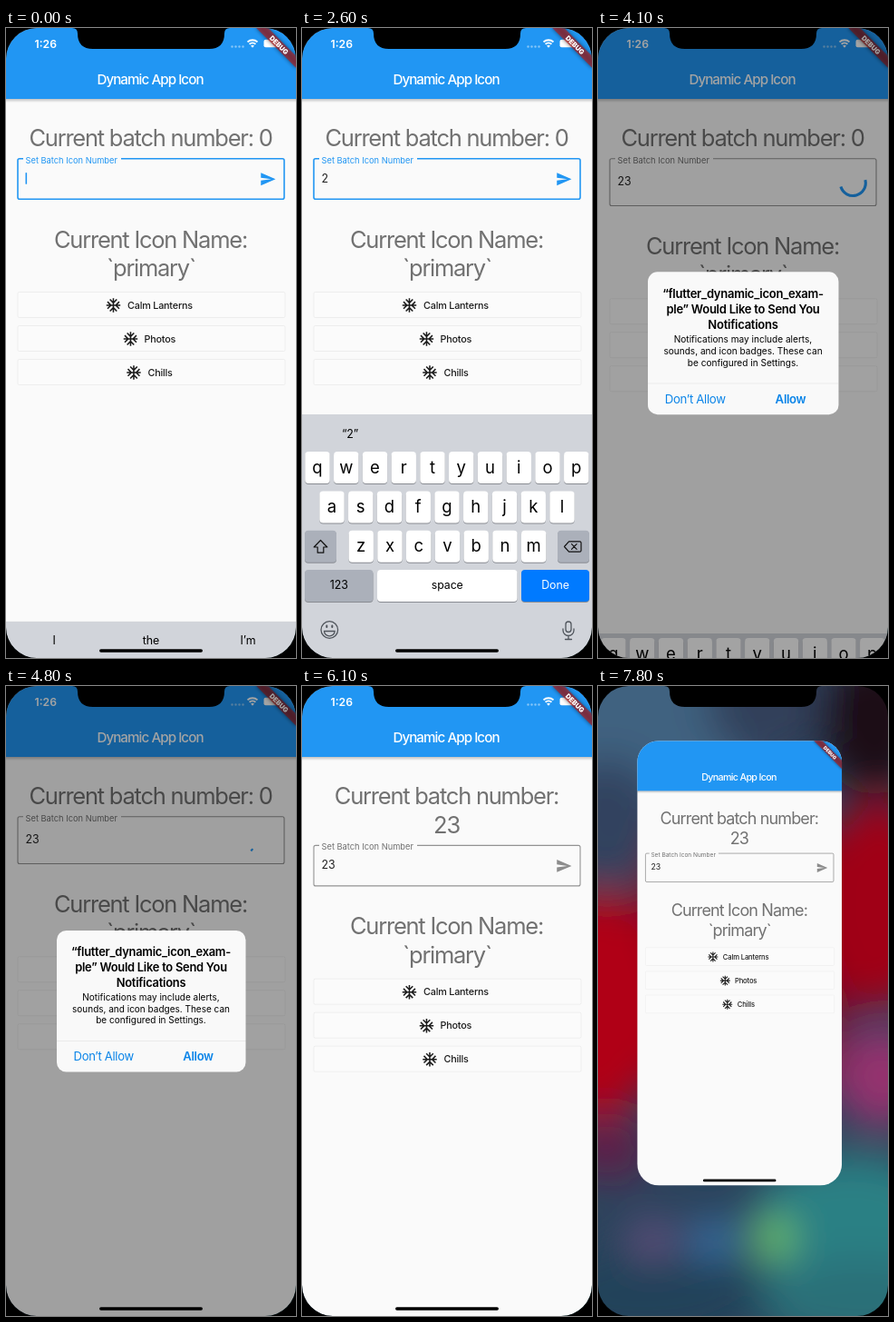
An HTML page that plays this animation: 320x693 px, repeating every 8000 ms.

```html
<!DOCTYPE html>
<html lang="en">
<head>
<meta charset="utf-8">
<title>Dynamic App Icon</title>
<style>
html, body { margin: 0; width: 100%; height: 100%; overflow: hidden; background: #000; }
svg { display: block; width: 100%; height: 100%; }
text { font-family: Inter, Roboto, sans-serif; font-optical-sizing: none; }
.mid { text-anchor: middle; }
.head { font-size: 25.5px; letter-spacing: -1.24px; fill: #000; fill-opacity: .55; text-anchor: middle; }
.btn { font-size: 10.8px; font-weight: 500; letter-spacing: -.2px; fill: #1c1c1c; }
.key { font-size: 18.5px; text-anchor: middle; }
.word { font-size: 12.4px; letter-spacing: -.1px; text-anchor: middle; }
.title { font-size: 12.9px; font-weight: 600; letter-spacing: -.25px; text-anchor: middle; }
.note { font-size: 10px; text-anchor: middle; }
.act { font-size: 13.1px; letter-spacing: -.35px; fill: #0a84e8; text-anchor: middle; }
.line { fill: none; stroke: #111; stroke-width: 1.2; stroke-linejoin: round; stroke-linecap: round; }
</style>
</head>
<body>
<svg viewBox="0 0 320 693">
  <defs>
    <clipPath id="screen"><rect width="320" height="693" rx="34"/></clipPath>
    <filter id="soft" x="-50%" y="-50%" width="200%" height="200%"><feGaussianBlur stdDeviation="22"/></filter>
    <filter id="glow" x="-20%" y="-100%" width="140%" height="300%"><feGaussianBlur stdDeviation="2"/></filter>
    <linearGradient id="shade" x2="0" y2="1">
      <stop stop-color="#000" stop-opacity=".28"/><stop offset="1" stop-color="#000" stop-opacity="0"/>
    </linearGradient>
    <path id="flake" d="M22 11h-4.17l3.24-3.24-1.41-1.42L15 11h-2V9l4.66-4.66-1.42-1.41L13 6.17V2h-2v4.17L7.76 2.93 6.34 4.34 11 9v2H9L4.34 6.34 2.93 7.76 6.17 11H2v2h4.17l-3.24 3.24 1.41 1.42L9 13h2v2l-4.66 4.66 1.42 1.41L11 17.83V22h2v-4.17l3.24 3.24 1.42-1.41L13 15v-2h2l4.66 4.66 1.41-1.42L17.83 13H22z"/>
  </defs>

  <rect width="320" height="693" fill="#2b435c"/>
  <g id="wall" filter="url(#soft)"></g>

  <g id="app" clip-path="url(#screen)">
    <rect width="320" height="693" fill="#fafafa"/>
    <rect y="77" width="320" height="5" fill="url(#shade)"/>
    <rect width="320" height="78" fill="#2196f3"/>
    <text class="mid" x="159" y="61.5" fill="#fff" font-size="15.2" font-weight="500" letter-spacing="-.95">Dynamic App Icon</text>
    <g id="status" fill="#fff">
      <text x="31.5" y="21.5" font-size="12.2" font-weight="600">1:26</text>
      <g opacity=".45">
        <circle cx="249.5" cy="20.5" r="1.2"/><circle cx="253.5" cy="20.5" r="1.2"/>
        <circle cx="257.5" cy="20.5" r="1.2"/><circle cx="261.5" cy="20.5" r="1.2"/>
      </g>
      <path d="M266.5 15.4a8 8 0 0 1 11 0M268.6 17.8a5 5 0 0 1 6.8 0" fill="none" stroke="#fff" stroke-width="1.9"/>
      <path d="M270.1 19.6a2.8 2.8 0 0 1 3.8 0L272 21.7z"/>
      <rect x="284.5" y="12.8" width="16" height="8.4" rx="2"/>
      <rect x="301.5" y="15.5" width="1.3" height="3" rx=".6" opacity=".5"/>
    </g>
    <text class="head" id="batch" x="159.5" y="130"></text>
    <text class="head" id="badge" x="159.5" y="161.7">23</text>
    <g id="field">
      <path id="outline" fill="none"/>
      <text id="label" x="21.5" y="5" font-size="9.3">Set Batch Icon Number</text>
      <g id="entry">
        <text id="value" x="21.5" y="26" font-size="12.4" fill="#212121"></text>
        <rect id="caret" y="15.5" width="1.6" height="12.5" fill="#2196f3"/>
      </g>
      <path id="send" transform="translate(279.7 13.2) scale(.773)" d="M2.01 21L23 12 2.01 3 2 10l15 2-15 2z"/>
      <path id="spinner" fill="none" stroke="#2196f3" stroke-width="3.1"/>
    </g>
    <g id="lower">
      <text class="head" x="159.5" y="241.5">Current Icon Name:</text>
      <text class="head" x="160" y="273">`primary`</text>
    </g>
    <g transform="translate(320 0) rotate(45)">
      <rect x="-31" y="21.7" width="62" height="9.3" opacity=".5" filter="url(#glow)"/>
      <rect x="-31" y="21.7" width="62" height="9.3" fill="#b71c1c" fill-opacity=".63"/>
      <text class="mid" y="29.1" fill="#fff" font-size="7.4" font-weight="900">DEBUG</text>
    </g>
    <g id="keys">
      <rect id="tray" width="320" height="268" fill="#d1d4da"/>
      <g id="words"></g>
    </g>
    <rect id="dim" width="320" height="693"/>
    <g id="alert">
      <rect x="56" y="269" width="208.5" height="155.5" rx="10.5" fill="#f9f9f9"/>
      <path d="M56 390.5H264.5" stroke="#000" stroke-opacity=".06"/>
      <text class="title" x="160" y="297">“flutter_dynamic_icon_exam-</text>
      <text class="title" x="160" y="314">ple” Would Like to Send You</text>
      <text class="title" x="160" y="331">Notifications</text>
      <text class="note" x="160" y="346.4">Notifications may include alerts,</text>
      <text class="note" x="160" y="358.9">sounds, and icon badges. These can</text>
      <text class="note" x="160" y="371.4">be configured in Settings.</text>
      <text class="act" x="107.7" y="412">Don’t Allow</text>
      <text class="act" x="212" y="412" font-weight="600">Allow</text>
    </g>
    <rect id="home" x="103" y="683.2" width="114" height="3.6" rx="1.8"/>
  </g>

  <path fill-rule="evenodd" d="M0 0H320V693H0zM34 0A34 34 0 0 0 0 34V659A34 34 0 0 0 34 693H286A34 34 0 0 0 320 659V34A34 34 0 0 0 286 0z"/>
  <path d="M73 0Q79 0 79 6V6Q79 23 96 23H224Q241 23 241 6V6Q241 0 247 0z"/>
</svg>
<script>
const LOOP = 8000, RISE = -28, TYPE_2 = 700, TYPE_3 = 3300, SEND = 3905,
      HIDE = 3944, CLOSE = 5750, DONE = 5950, SWIPE = 7000;
const SPEED = 1.29, BLUE = '#2196f3';
const $ = id => document.getElementById(id);
const clamp = x => Math.max(0, Math.min(1, x));
const ramp = (t, from, ms) => clamp((t - from) / ms);
const set = (id, attrs) => { for (const k in attrs) $(id).setAttribute(k, attrs[k]); };
const add = (id, markup) => $(id).insertAdjacentHTML('beforeend', markup);

// Critically damped spring of the system keyboard and alerts
function spring(ms) {
  const x = Math.max(0, ms) * .01826 * SPEED;
  return 1 - (1 + x) * Math.exp(-x);
}

// Material "fast out, slow in": cubic-bezier(.4, 0, .2, 1)
function fastOut(x) {
  let lo = 0, hi = 1, s;
  for (let i = 0; i < 20; i++) {
    s = (lo + hi) / 2;
    const bx = 1.2 * s * (1 - s) ** 2 + .6 * s * s * (1 - s) + s ** 3;
    if (bx < x) lo = s; else hi = s;
  }
  return 3 * s * s * (1 - s) + s ** 3;
}

// Indeterminate progress ring: one turn per cycle, stepped back after each
function arc(ms) {
  const cycle = Math.floor(ms / 1333), turn = ms / 1333 - cycle;
  const head = fastOut(clamp(turn * 2)), tail = fastOut(clamp(turn * 2 - 1));
  const a = Math.PI * (-.5 + 1.5 * tail + 2 * turn - .8 * cycle);
  const sweep = Math.max(1.5 * Math.PI * (head - tail), .01);
  const at = q => `${281.3 + 14 * Math.cos(q)} ${26.8 + 14 * Math.sin(q)}`;
  return `M${at(a)}A14 14 0 ${+(sweep > Math.PI)} 1 ${at(a + sweep)}`;
}

const outline = h =>
  `M127 0H305q2 0 2 2V${h - 2}q0 2 -2 2H15q-2 0 -2 -2V2q0 -2 2 -2H19`;

// Blurred wallpaper and dock: x, y, rx, ry, colour
[
  [160, 300, 120, 200, '#7c1028'], [60, 40, 130, 90, '#3f6280'], [190, 20, 70, 60, '#33405a'],
  [305, 40, 60, 80, '#1c0d18'], [10, 150, 60, 70, '#30435e'], [0, 350, 80, 125, '#b00014'],
  [310, 240, 70, 115, '#a00418'], [315, 430, 55, 55, '#94326e'], [10, 510, 50, 35, '#5c2448'],
  [280, 600, 115, 85, '#2a8084'], [290, 680, 110, 50, '#2a7078'], [50, 670, 130, 55, '#22425a'],
  [60, 608, 28, 22, '#62507e'], [128, 608, 26, 22, '#3a72a8'], [193, 607, 20, 20, '#7cd050']
].forEach(([x, y, rx, ry, c]) =>
  add('wall', `<ellipse cx="${x}" cy="${y}" rx="${rx}" ry="${ry}" fill="${c}"/>`));

[['Calm Lanterns', 118.5, 134], ['Photos', 137.5, 152.5], ['Chills', 141, 156.5]]
  .forEach(([name, icon, x], i) => {
    const y = 290.5 + 37 * i;
    add('lower', `<rect x="13" y="${y}" width="295" height="28" rx="1.5" fill="#fbfbfb" stroke="#000" stroke-opacity=".05"/>
      <use href="#flake" transform="translate(${icon - 9.3} ${y + 5.2}) scale(.773)" fill="#1c1c1c"/>
      <text class="btn" x="${x}" y="${y + 18.1}">${name}</text>`);
  });

function key(x, y, w, label, fill = '#fff', cls = 'word', ink = '#000') {
  const dy = cls === 'key' ? 23.5 : 21.3;
  add('keys', `<rect x="${x}" y="${y + 1}" width="${w}" height="35" rx="4" fill="#898c92"/>
    <rect x="${x}" y="${y}" width="${w}" height="35" rx="4" fill="${fill}"/>
    <text class="${cls}" x="${x + w / 2}" y="${y + dy}" fill="${ink}">${label}</text>`);
}
['qwertyuiop', 'asdfghjkl', 'zxcvbnm'].forEach((row, r) =>
  [...row].forEach((c, i) => key([3.3, 19.3, 51.5][r] + 31.75 * i, 466 + 43.4 * r, 27.4, c, '#fff', 'key')));
key(3, 552.8, 35, '', '#abb0ba');
key(282, 552.8, 35, '', '#abb0ba');
key(3, 596, 75.5, '123', '#abb0ba');
key(83, 596, 154.5, 'space');
key(242, 596, 75, 'Done', '#007aff', 'word', '#fff');
add('keys', `<path class="line" d="M20.5 563.5l-7.3 7.5h4v6.2h6.6v-6.2h4z"/>
  <path class="line" d="M289.5 570.5l5-5.7h12q1.5 0 1.5 1.5v8.4q0 1.5 -1.5 1.5h-12zM297.5 567.7l5.6 5.6m0 -5.6l-5.6 5.6"/>
  <g fill="none" stroke="#50555c" stroke-width="1.3" stroke-linecap="round">
    <circle cx="30.3" cy="662" r="9.3"/><path d="M24.5 663.5h11.6a5.8 5.4 0 0 1 -11.6 0z"/>
    <path d="M27.3 657.5v1.5M33.3 657.5v1.5" stroke-width="2"/>
    <rect x="291" y="653" width="6" height="11.5" rx="3"/>
    <path d="M288 661v1.5a6 6 0 0 0 12 0V661M294 668.5v4M290.5 672.5h7"/>
  </g>`);
[['I', 53, 'first'], ['the', 160, 'first'], ['I’m', 267, 'first'], ['“2”', 53, 'two'], ['“23”', 53, 'more']]
  .forEach(([w, x, c]) => add('words', `<text class="word ${c}" x="${x}" y="450.5">${w}</text>`));
const show = (cls, o) => document.querySelectorAll('.' + cls).forEach(e => e.style.opacity = o);

function draw(t) {
  const sent = t >= SEND, done = t >= DONE, busy = sent && !done;
  const top = done ? 31.7 : 0, grow = busy ? 7.3 : 0;

  $('batch').textContent = 'Current batch number:' + (done ? '' : ' 0');
  set('badge', { opacity: +done });
  set('field', { transform: `translate(0 ${143.7 + top})` });
  set('outline', {
    d: outline(44.5 + grow), stroke: sent ? '#000' : BLUE,
    'stroke-opacity': sent ? .42 : 1, 'stroke-width': sent ? 1.1 : 1.6
  });
  set('label', { fill: sent ? '#707070' : BLUE });
  set('entry', { transform: `translate(0 ${grow / 2})` });
  const text = t < TYPE_2 ? '' : t < TYPE_3 ? '2' : '23';
  $('value').textContent = text;
  const blinkOff = t >= 1600 && t < 2100 || t >= 2600 && t < 3100;
  set('caret', { x: 21.5 + 7.8 * text.length, opacity: +!(sent || blinkOff) });
  set('send', { fill: sent ? '#8c8c8c' : BLUE, opacity: +!busy });
  set('spinner', { d: arc(Math.max(0, t - 3883) * SPEED), opacity: +busy });
  set('lower', { transform: `translate(0 ${top + grow})` });

  // Keyboard: the word bar is dropped before it slides away
  const leaving = t >= HIDE;
  const slide = leaving ? 232 * spring(t - HIDE) : 268 * (1 - spring(t - RISE));
  const gone = leaving && slide > 231.5;
  set('keys', { transform: `translate(0 ${slide})`, opacity: +!gone });
  set('tray', { y: leaving ? 461 : 425 });
  set('words', { opacity: +!leaving });
  const swap = ramp(t, TYPE_2, 250), next = ramp(t, TYPE_3, 250);
  show('first', 1 - swap);
  show('two', swap * (1 - next));
  show('more', next);

  const pop = spring(t - HIDE), shown = Math.min(1, pop * 1.14) * (1 - ramp(t, CLOSE, 250));
  const zoom = 1 + .08 * (1 - pop);
  set('dim', { opacity: .36 * shown });
  set('alert', {
    opacity: shown,
    transform: `translate(160 346.5) scale(${zoom}) translate(-160 -346.5)`
  });
  set('home', { opacity: +!(leaving && !gone) });

  const p = ramp(t, SWIPE, 800), e = p * p * (3 - 2 * p);
  set('status', { opacity: 1 - ramp(t, SWIPE, 250) });
  set('app', {
    transform: `translate(${160 - 3.8 * e} ${346.5 - 41.6 * e}) scale(${1 - .294 * e}) translate(-160 -346.5)`
  });
}

const start = performance.now();
function tick() {
  draw((performance.now() - start) % LOOP);
  requestAnimationFrame(tick);
}
tick();
</script>
</body>
</html>
```
